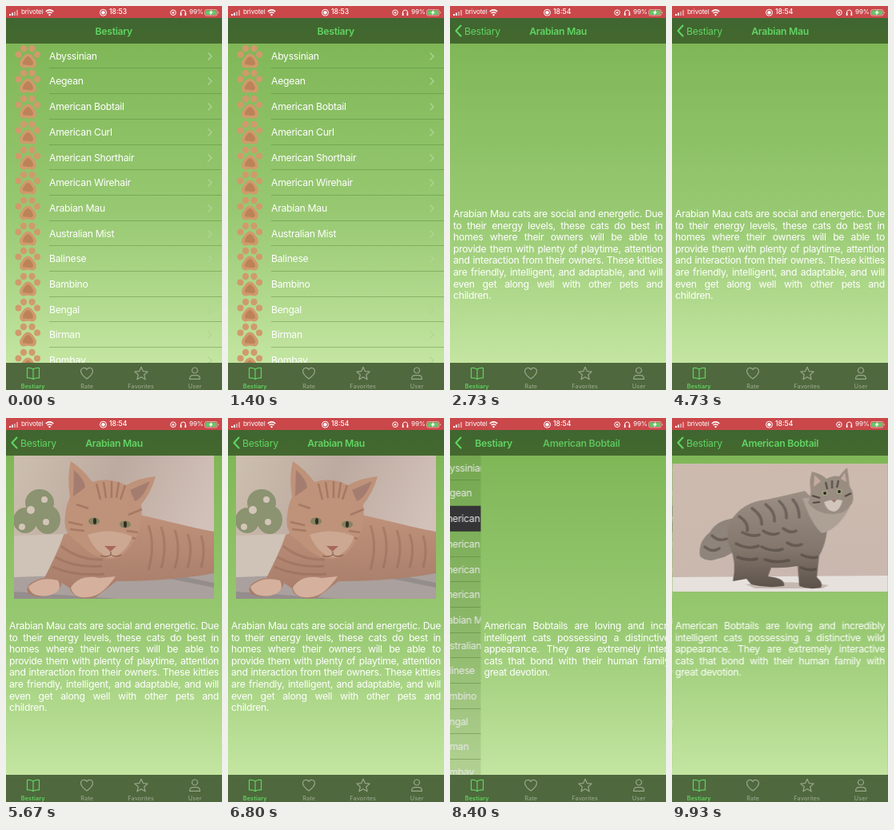
An HTML page that plays this animation: 270x480 px, repeating every 9.99 s.

```html
<!DOCTYPE html>
<html lang="en">
<head>
<meta charset="utf-8">
<title>Bestiary</title>
<style>
html, body { margin: 0; width: 100%; height: 100%; overflow: hidden; }
body { font: 400 12.24px/14.6px Inter, sans-serif; letter-spacing: -.024em; color: #fff; }
svg { display: block; position: absolute; overflow: hidden; }
#stage { position: absolute; left: 0; top: 0; width: 270px; height: 480px; overflow: hidden; background: #7cb552; }
.page { position: absolute; inset: 0; overflow: hidden; will-change: transform;
  background: linear-gradient(#78b24e 0, #7fb757 46px, #98c972 260px, #c3e5a1 445px); }
.row { position: absolute; left: 0; width: 270px; height: 31.68px; line-height: 31.68px; }
.row b { position: absolute; inset: 0; background: #3a3a3c; opacity: 0; }
.row span { position: absolute; left: 54px; top: 0; white-space: nowrap; }
.row i { position: absolute; left: 54px; right: 0; bottom: 0; height: 1px; background: #4f8036; opacity: .42; }
.row svg { left: 0; top: 0; }
#dim { position: absolute; inset: 0; background: #000; }
.text { position: absolute; left: 4px; top: 253px; width: 262px; }
.text div { white-space: nowrap; text-align: justify; text-align-last: justify; }
.text div:last-child { text-align-last: left; }
#status { position: absolute; left: 0; top: 0; width: 270px; height: 15px; background: #ca474a; }
#nav { position: absolute; left: 0; top: 15px; width: 270px; height: 32px; line-height: 33px;
  background: linear-gradient(#3f6631, #44682e); color: #62d463; overflow: hidden; }
.title { position: absolute; left: 0; width: 270px; text-align: center; font-weight: 600; white-space: nowrap; }
#back { position: absolute; left: 18px; top: 0; white-space: nowrap; }
#tabs { position: absolute; left: 0; top: 446px; width: 270px; height: 34px; background: #4f683d; }
.tab { position: absolute; top: 0; width: 67.5px; height: 34px; color: #98a68c; text-align: center;
  font: 500 7.2px/9px Inter, sans-serif; letter-spacing: .02em; }
.tab.on { color: #62d463; font-weight: 600; }
.tab span { position: absolute; left: 0; width: 100%; top: 25px; }
.tab svg { left: 23.75px; top: 3px; fill: none; stroke: currentColor; stroke-width: 1.2; stroke-linejoin: round; stroke-linecap: round; }
#status svg { top: .5px; }
#status span { position: absolute; top: 0; line-height: 15.4px; font-size: 8.2px; white-space: nowrap; letter-spacing: -.02em; }
#status #clock { left: 129px; font-size: 8.6px; font-weight: 500; letter-spacing: 0; }
</style>
</head>
<body>
<svg width="0" height="0">
  <symbol id="paw" viewBox="0 0 54 32">
    <g fill="#d09a6c">
      <circle cx="22" cy="6" r="4.2"/><circle cx="32.500" cy="6" r="4.2"/>
      <circle cx="15.500" cy="13.500" r="4"/><circle cx="39" cy="13.500" r="4"/>
      <path d="M27.500 12.500C31.500 12.500 33.500 16.500 36.500 20.500C39.500 25 37.500 30.500 33 30.500C31 30.500 30 29.800 27.500 29.800S24 30.500 22 30.500C17.500 30.500 15.500 25 18.500 20.500C21.500 16.500 23.500 12.500 27.500 12.500Z"/>
    </g>
    <path d="M27.500 16C30 16 34 21.500 34 24.500S31 27.500 27.500 27S21 27.500 21 24.500S25 16 27.500 16Z" fill="#bd8358"/>
  </symbol>
</svg>

<div id="stage">
  <div class="page" id="list"></div>

  <div class="page" id="mau">
    <svg id="mauPic" style="left:10px;top:46px" width="250" height="180" viewBox="10 46 250 180">
      <defs>
        <linearGradient id="wall" x2="1" y2=".3"><stop stop-color="#cdbfae"/><stop offset=".5" stop-color="#bcaaa0"/><stop offset="1" stop-color="#d2c1b8"/></linearGradient>
        <linearGradient id="fur" x2="0" y2="1"><stop stop-color="#c0927b"/><stop offset="1" stop-color="#a67c69"/></linearGradient>
      </defs>
      <path d="M10 46H260V226H10Z" fill="url(#wall)"/>
      <g fill="#8b9370"><ellipse cx="42" cy="106" rx="18" ry="17"/><ellipse cx="24" cy="128" rx="15" ry="16"/><ellipse cx="52" cy="127" rx="16" ry="18"/></g>
      <g fill="#d3c5b8"><circle cx="31" cy="115" r="5"/><circle cx="48" cy="102" r="4"/><circle cx="20" cy="136" r="4"/><circle cx="50" cy="130" r="4"/></g>
      <path d="M10 147L72 145V202H10Z" fill="#cfc2b6"/>
      <path d="M10 199L260 190V226H10Z" fill="#aaa09d"/>
      <path d="M10 217L140 226H10ZM180 196L260 212V206L200 194Z" fill="#958d8c"/>
      <path d="M150 118C188 124 224 136 260 142V194C214 203 160 204 138 204L112 224C98 228 82 224 80 213L70 206C66 224 38 227 28 219C22 210 34 202 48 200C58 180 66 164 72 146Z" fill="url(#fur)"/>
      <path d="M178 134q9 25 0 56M194 136q8 24 0 52M211 140q8 22 0 48M227 145q7 18 0 42M244 147q6 18 0 40M69 160q22 18 52 17M62 174q24 14 58 11M58 186q26 12 65 9" fill="none" stroke="#8d6350" stroke-width="3" opacity=".4"/>
      <path d="M28 211Q42 197 65 203Q72 218 53 222Q32 225 28 211ZM81 212Q92 195 117 200L137 198Q119 224 102 224Q84 226 81 212Z" fill="#d5b19d"/>
      <path d="M81 54Q96 64 108 80Q128 73 150 84Q166 75 187 73Q181 94 169 108Q172 140 159 155Q148 175 130 176Q107 175 91 156Q70 144 74 122Q75 109 80 99Q76 73 81 54Z" fill="#bf927a"/>
      <path d="M85 65Q98 76 99 87L84 98ZM180 79Q171 101 161 104L155 90Z" fill="#a57d70"/>
      <path d="M113 82l5 20M122 80l3 20M132 79v21M141 80l-3 20M149 84l-6 18M88 108l15 5M170 114l-17 7M78 130l18 4M80 139l18 2M165 143l-14-2M162 151l-13-4" fill="none" stroke="#8f624d" stroke-width="2.500" opacity=".5"/>
      <path d="M102 146Q130 136 158 148Q150 170 131 174Q112 170 102 146Z" fill="#cca893"/>
      <g fill="#83835f"><ellipse cx="110" cy="129" rx="7" ry="4.500"/><ellipse cx="149" cy="133" rx="7" ry="4.500"/></g>
      <g fill="#342b23"><ellipse cx="111" cy="129" rx="2" ry="4"/><ellipse cx="149" cy="133" rx="2" ry="4"/></g>
      <path d="M123 160h15l-7.500 7Z" fill="#a8685c"/>
      <path d="M131 167v4q-7 4-13 1M131 171q7 4 13 0" fill="none" stroke="#7d5342"/>
    </svg>
    <div class="text"></div>
  </div>

  <div class="page" id="bob">
    <svg id="bobPic" style="left:0;top:56.5px" width="270" height="160" viewBox="0 56 270 160">
      <defs>
        <linearGradient id="room" x2=".2" y2="1"><stop stop-color="#cdbbae"/><stop offset="1" stop-color="#cab8af"/></linearGradient>
        <linearGradient id="coat" x2="0" y2="1"><stop stop-color="#9c9085"/><stop offset=".6" stop-color="#83776d"/><stop offset="1" stop-color="#5d524a"/></linearGradient>
      </defs>
      <path d="M0 56H270V216H0Z" fill="url(#room)"/>
      <path d="M0 198L270 196V216H0Z" fill="#e6e1dc"/>
      <path d="M92 207Q140 201 196 208L188 212H104Z" fill="#c4b8b0"/>
      <path d="M80 124Q56 126 47 142Q32 154 35 172Q44 180 57 175Q74 172 84 158Z" fill="#8f847b"/>
      <path d="M74 127Q88 104 118 101Q146 95 166 90L194 119Q196 151 184 171L181 198Q190 206 186 211Q171 214 159 209L157 184Q138 187 124 186L120 197Q142 199 140 209Q118 212 99 207L93 200L76 203Q81 180 73 162Q65 145 74 127Z" fill="url(#coat)"/>
      <path d="M84 122q12 8 10 18M100 112q13 9 12 20M117 107q12 9 11 21M134 103q10 9 9 21M151 101q8 9 8 22M88 142q12 6 21 3M114 140q10 7 19 3M139 137q9 7 16 3M80 156q15 8 28 3M112 160q14 7 26 3M144 155q10 6 18 2M82 173q14 5 24 2M116 176q14 5 30 1M162 170q10 5 19 3M161 186q10 4 18 2M41 160q9 8 18 2M50 146q8 8 18 4" fill="none" stroke="#463e38" stroke-width="3.500" stroke-linecap="round" opacity=".5"/>
      <path d="M163 99Q173 130 187 143Q207 139 222 111L208 98Z" fill="#ada196"/>
      <path d="M175 66Q187 69 193 75Q202 70 209 72Q213 66 219 61Q221 74 222 84Q229 95 225 106Q216 120 201 119Q181 119 170 105Q174 97 173 87Q171 77 175 66Z" fill="#998d81"/>
      <path d="M178 70l8 8-9 7ZM216 67l2 12-7-4Z" fill="#c5aaa0"/>
      <path d="M192 79l2 9M200 77v10M208 77l-2 9M175 96l10 3M176 105l9-1M224 93l-8 4" fill="none" stroke="#514840" stroke-width="2"/>
      <path d="M190 104Q202 99 213 102Q210 115 202 116Q193 115 190 104Z" fill="#d0c6bc"/>
      <g fill="#a8ae88"><ellipse cx="191" cy="93" rx="3.500" ry="3"/><ellipse cx="209" cy="91" rx="3.500" ry="3"/></g>
      <g fill="#28231f"><circle cx="191" cy="93" r="2"/><circle cx="209" cy="91" r="2"/></g>
      <path d="M199 101h7l-3.500 4Z" fill="#a0766a"/>
    </svg>
    <div class="text"></div>
  </div>

  <div id="nav">
    <svg id="chevron" width="20" height="32" fill="none" stroke="currentColor" stroke-width="2.100" stroke-linecap="round" stroke-linejoin="round"><path d="M13.500 9.500L7.500 16l6 6.500"/></svg>
    <div id="back">Bestiary</div>
    <div class="title" id="mauTitle">Arabian Mau</div>
    <div class="title" id="bobTitle">American Bobtail</div>
  </div>

  <div id="status">
    <svg width="270" height="14" fill="#fff">
      <path d="M4 9h2v2H4ZM7 7.500h2V11H7Z"/><path d="M10 6h2v5h-2ZM13 4h2v7h-2Z" opacity=".45"/>
      <g fill="none" stroke="#fff" stroke-width="1.500"><path d="M49.700 6q4.800-4.200 9.600 0M51.500 8q3-2.600 6 0"/></g>
      <circle cx="54.500" cy="10" r="1.200"/>
      <g fill="none" stroke="#fff">
        <circle cx="121.500" cy="7.200" r="4"/>
        <circle cx="209" cy="7.200" r="3.300"/>
        <path d="M218.500 9V7a3 3 0 0 1 6 0v2"/>
        <rect x="248.500" y="3.500" width="15.500" height="7.500" rx="2" opacity=".5"/>
      </g>
      <circle cx="121.500" cy="7.200" r="2.200"/>
      <rect x="207.800" y="6.200" width="2.400" height="2.200"/>
      <path d="M217.800 7.500h1.700V11h-1.700ZM223.500 7.500h1.700V11h-1.700ZM265 6q1.600 1.200 0 2.500Z"/>
      <rect x="249.500" y="4.500" width="13.500" height="5.500" rx="1.200" fill="#67c765"/>
      <path d="M257.500 3.500l-4 4.200h2.300l-1 3.300 4-4.500h-2.300Z"/>
    </svg>
    <span style="left:19px">brivotel</span>
    <span id="clock"></span>
    <span style="left:229px">99%</span>
  </div>

  <div id="tabs"></div>
</div>

<script>
const LOOP = 9990, WIDTH = 270, TOP = 46.8, ROW = 31.68;
const OPEN_MAU = 2170, MAU_PIC = 5600, CLOSE_MAU = 7300, OPEN_BOB = 8210, BOB_PIC = 9200, MINUTE = 2000;
const MAU_ROW = 6, BOB_ROW = 2;

const breeds = ["Abyssinian", "Aegean", "American Bobtail", "American Curl", "American Shorthair",
  "American Wirehair", "Arabian Mau", "Australian Mist", "Balinese", "Bambino", "Bengal", "Birman", "Bombay"];

const about = {
  mau: ["Arabian Mau cats are social and energetic. Due", "to their energy levels, these cats do best in",
    "homes where their owners will be able to", "provide them with plenty of playtime, attention",
    "and interaction from their owners. These kitties", "are friendly, intelligent, and adaptable, and will",
    "even get along well with other pets and", "children."],
  bob: ["American Bobtails are loving and incredibly", "intelligent cats possessing a distinctive wild",
    "appearance. They are extremely interactive", "cats that bond with their human family with", "great devotion."]
};

const tabs = [
  ["Bestiary", "M10 5Q7 3 2.500 3.500V16Q7 15.500 10 17.500Q13 15.500 17.500 16V3.500Q13 3 10 5V17.500"],
  ["Rate", "M10 17Q2.500 11.500 2.500 7.200A4 4 0 0 1 10 5.500A4 4 0 0 1 17.500 7.200Q17.500 11.500 10 17Z"],
  ["Favorites", "M10 2.200l2.300 5.400 5.900.5-4.500 3.900 1.400 5.800-5.100-3.100-5.100 3.100 1.400-5.800L1.800 8.100l5.900-.5Z"],
  ["User", "M10 3a3.500 3.500 0 1 0 .01 0M3.500 17.300Q3.500 12.700 8 12.700H12Q16.500 12.700 16.500 17.300Z"]
];

const $ = id => document.getElementById(id);

$("list").innerHTML = breeds.map((name, i) =>
  `<div class="row" style="top:${TOP + i * ROW}px"><b></b><i></i>
    <svg width="54" height="32"><use href="#paw"/></svg><span>${name}</span>
    <svg style="left:250px" width="10" height="32" fill="none" stroke="#b2d496" stroke-width="1.300"><path d="M2.500 11.500L7 16l-4.500 4.500"/></svg>
  </div>`).join("") + '<div id="dim"></div>';

for (const id in about)
  $(id).querySelector(".text").innerHTML = about[id].map(line => `<div>${line}</div>`).join("");

$("tabs").innerHTML = tabs.map(([name, path], i) =>
  `<div class="tab${i ? "" : " on"}" style="left:${i * 67.5}px">
    <svg width="20" height="20"><path d="${path}"/></svg><span>${name}</span></div>`).join("");

const marks = document.querySelectorAll(".row b");
const backWidth = 47, backShift = (WIDTH - backWidth) / 2 - 18;

// Critically damped spring from 0 to 1, settled after half a second
function spring(ms) {
  if (ms <= 0) return 0;
  if (ms >= 500) return 1;
  const k = ms * .018;
  return 1 - (1 + k) * Math.exp(-k);
}

function place(id, open) {
  const away = 1 - open;
  $(id).style.transform = `translateX(${away * WIDTH}px)`;
  $(id).style.visibility = open > 0 ? "visible" : "hidden";
  $(id + "Title").style.transform = `translateX(${away * 205}px)`;
  $(id + "Title").style.opacity = open;
}

function draw(t) {
  const closing = spring(t - CLOSE_MAU);
  const mau = spring(t - OPEN_MAU) - closing;
  const bob = spring(t - OPEN_BOB);
  const open = Math.max(mau, bob);

  place("mau", mau);
  place("bob", bob);
  $("list").style.transform = `translateX(${-.3 * WIDTH * open}px)`;
  $("dim").style.opacity = .1 * open;
  $("back").style.transform = `translateX(${backShift * (1 - open)}px)`;
  $("back").style.fontWeight = open > .95 ? 400 : 600;
  $("chevron").style.opacity = Math.min(1, open * 1.2);

  marks[MAU_ROW].style.opacity = t > OPEN_MAU - 70 ? 1 - closing : 0;
  marks[BOB_ROW].style.opacity = t > OPEN_BOB - 70 ? 1 : 0;
  $("mauPic").style.display = t >= MAU_PIC ? "block" : "none";
  $("bobPic").style.display = t >= BOB_PIC ? "block" : "none";
  $("clock").textContent = t < MINUTE ? "18:53" : "18:54";
}

const start = performance.now();
function tick() {
  draw((performance.now() - start) % LOOP);
  requestAnimationFrame(tick);
}
tick();
</script>
</body>
</html>
```
